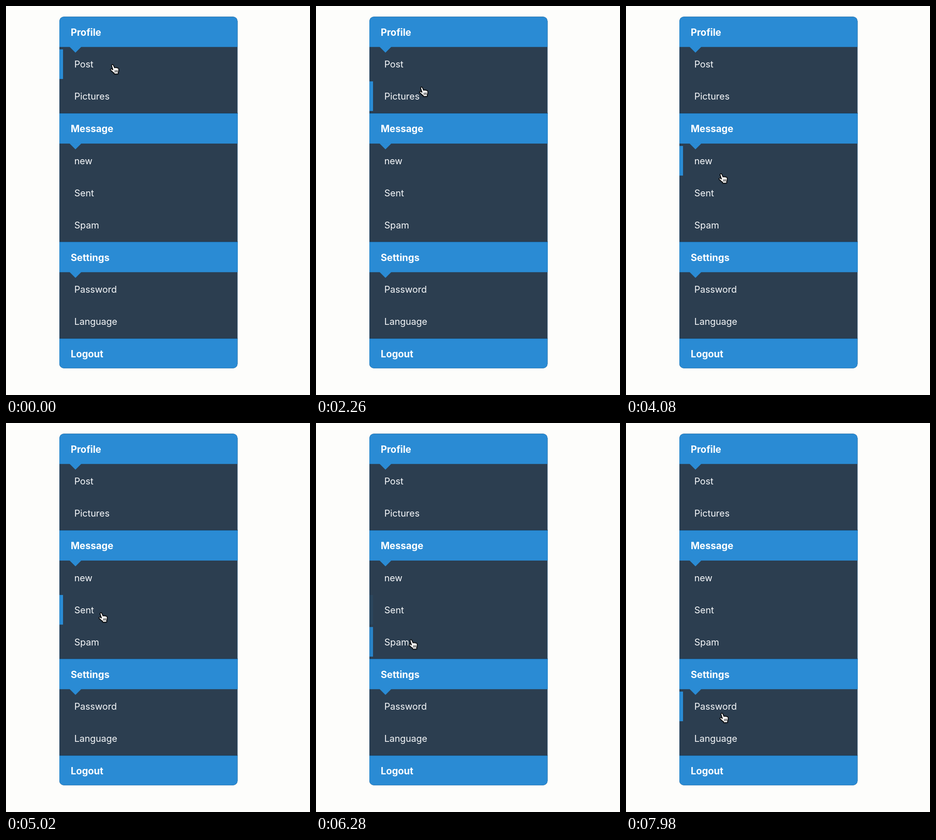
Write an HTML page that moves like this. It is 661x848 px and loops after 8000 ms.

```html
<!DOCTYPE html>
<html lang="en">
<head>
<meta charset="utf-8">
<title>Menu</title>
<style>
html, body { margin: 0; width: 100%; height: 100%; overflow: hidden; background: #fdfdfb; }
svg { display: block; width: 661px; height: 848px; }
text { font-family: Inter, "Liberation Sans", sans-serif; font-size: 20px; fill: #f7f9fb; }
.title { font-size: 20.8px; font-weight: 700; fill: #fff; }
.blue { fill: #2a8bd4; }
.edge { fill: #2378b9; }
.shade { fill: #23384c; }
.bar { opacity: 0; animation: 8s linear infinite; }
#Post { animation-name: post; }
#Pictures { animation-name: pictures; }
#new { animation-name: fresh; }
#Sent { animation-name: sent; }
#Spam { animation-name: spam; }
#Password { animation-name: password; }
@keyframes post { 0%, 20.5% { opacity: 1 } 25.5%, 100% { opacity: 0 } }
@keyframes pictures { 0%, 20.5% { opacity: 0 } 25.5%, 37.2% { opacity: 1 } 42.2%, 100% { opacity: 0 } }
@keyframes fresh { 0%, 39.8% { opacity: 0 } 44.8%, 54.5% { opacity: 1 } 59.5%, 100% { opacity: 0 } }
@keyframes sent { 0%, 54.5% { opacity: 0 } 59.5%, 74% { opacity: 1 } 79%, 100% { opacity: 0 } }
@keyframes spam { 0%, 74% { opacity: 0 } 79%, 86.2% { opacity: 1 } 91.2%, 100% { opacity: 0 } }
@keyframes password { 0%, 91% { opacity: 0 } 96%, 100% { opacity: 1 } }
#hand { animation: move 8s ease-in-out infinite; }
@keyframes move {
  0%, 14% { transform: translate(231px, 128px) }
  25%, 31% { transform: translate(229px, 177px); animation-timing-function: ease-in }
  40% { transform: translate(211px, 313px); animation-timing-function: ease-out }
  46%, 51% { transform: translate(206px, 366px) }
  59%, 70% { transform: translate(206px, 414px) }
  79%, 82% { transform: translate(206px, 473px); animation-timing-function: ease-in }
  87.25% { transform: translate(206px, 542px); animation-timing-function: ease-out }
  96%, 100% { transform: translate(208px, 633px) }
}
</style>
</head>
<body>
<svg viewBox="0 0 661 848">
  <defs>
    <clipPath id="panel"><rect x="116" y="23.3" width="387.5" height="766.5" rx="10"/></clipPath>
  </defs>
  <g clip-path="url(#panel)">
    <rect x="116" y="23" width="388" height="767" fill="#2c3e50"/>
    <g id="menu"></g>
    <rect x="116.4" y="23.7" width="386.7" height="765.7" rx="9.6" fill="none" stroke="#2378b9" stroke-opacity=".45" stroke-width=".8"/>
  </g>
  <g id="hand" stroke="#000" stroke-linejoin="round" stroke-linecap="round">
    <path d="M-1.2 2.2C-2 .2 1-1.5 2.2 .8L5 7C5.6 5.6 7.6 5.5 8.2 7C9.2 5.8 11 6.2 11.3 7.7C12.7 6.9 13.9 7.7 14 9.4C14.2 12 14.1 14 13 16L12.8 19.7L4.8 20.3L4 18C1.2 16.4-.8 13.8-3.2 11.7C-4.5 10.3-2.7 8.5-1 9.6L1.6 11.1Z" fill="#fff" stroke-width="1.5" style="filter:drop-shadow(0 1px 1px rgba(0,0,0,.4))"/>
    <path d="M5.8 12.2L6.2 16.4M8.4 12L8.7 16.3M11 11.8L11.1 16.1" fill="none" stroke-width="1.1"/>
  </g>
</svg>
<script>
const sections = [
  ["Profile", "Post", "Pictures"],
  ["Message", "new", "Sent", "Spam"],
  ["Settings", "Password", "Language"],
  ["Logout"]
];
const panelTop = 23.3, headHeight = 66, rowPitch = 69.8, barHeight = 64.6;

const rect = (name, y, width, height, id = name + y) =>
  `<rect class="${name}" id="${id}" x="116" y="${y}" width="${width}" height="${height}"/>`;

function drawMenu() {
  let headY = panelTop, markup = "";
  for (const [title, ...items] of sections) {
    const bottom = headY + headHeight;
    markup += rect("blue", headY, 388, headHeight);
    if (headY > panelTop) markup += rect("shade", headY - 1, 388, 1) + rect("edge", headY, 388, 1);
    markup += `<text class="title" x="140.7" y="${headY + 41.5}">${title}</text>`;
    if (items.length) markup += `<path class="blue" d="M138 ${bottom - .5}h26l-13 13z"/>`;
    items.forEach((label, i) => {
      const y = bottom + 5.2 + i * rowPitch;
      markup += rect("bar blue", y, 8, barHeight, label);
      markup += `<text x="148.4" y="${y + 39.8}">${label}</text>`;
    });
    headY = bottom + items.length * rowPitch + 5;
  }
  return markup;
}
document.getElementById("menu").innerHTML = drawMenu();
</script>
</body>
</html>
```
